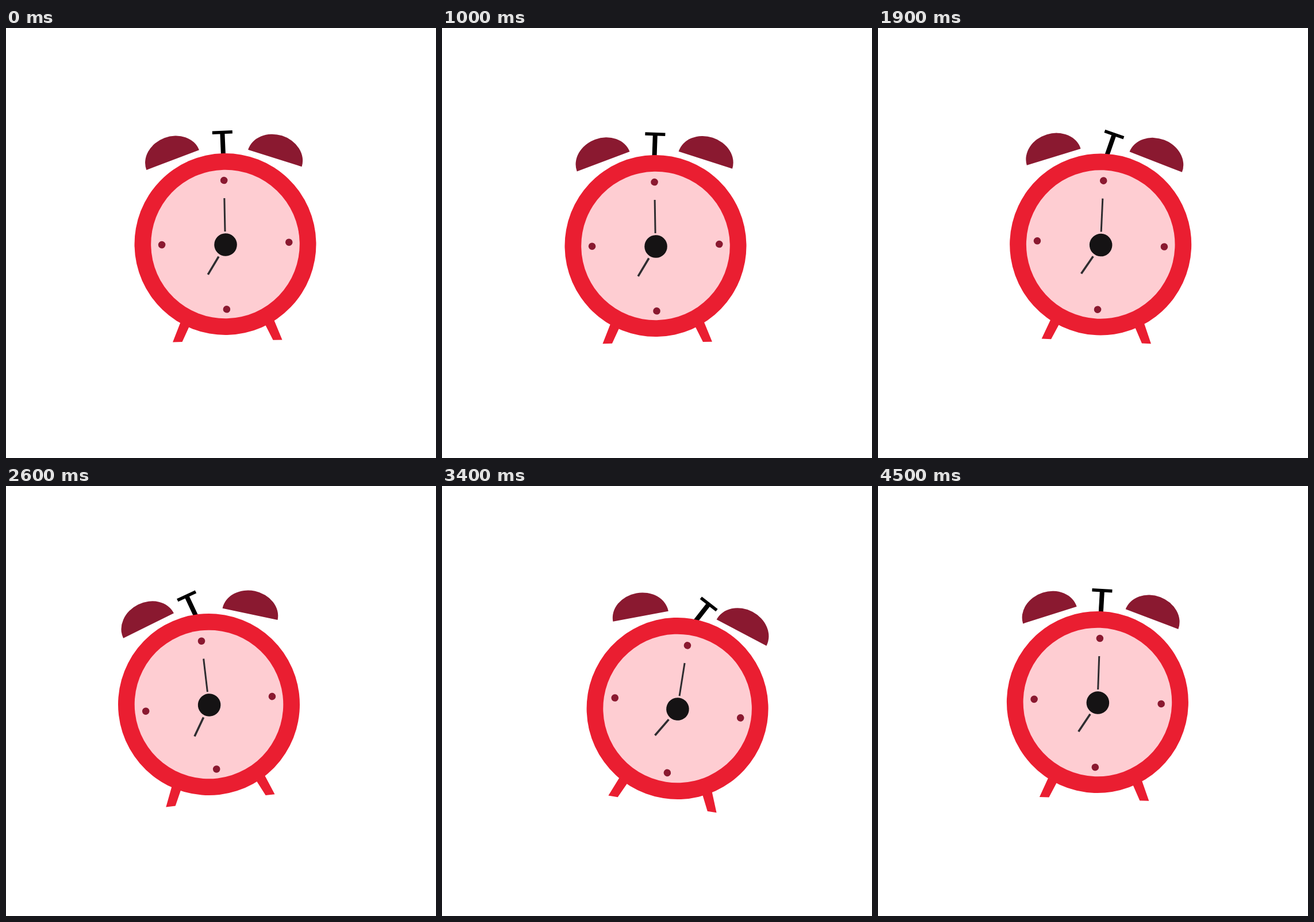
An HTML page that plays this animation: 748x748 px, repeating every 4600 ms.

```html
<!DOCTYPE html>
<html lang="en">
<head>
<meta charset="utf-8">
<title>Ringing alarm clock</title>
<style>
  html, body { margin: 0; width: 100%; height: 100%; overflow: hidden; background: #fff; }
  svg { display: block; width: 100%; height: 100%; }
</style>
</head>
<body>
<svg viewBox="0 0 748 748">
  <g id="clock">
    <g id="hammer">
      <path d="M0-192.5V-148" stroke="#000" stroke-width="8"/>
      <path d="M-17.5-194.5H17.5" stroke="#000" stroke-width="5.5"/>
    </g>
    <g fill="#8a1930">
      <path d="M-49 0A49 41 0 0 1 49 0Z" transform="translate(-88.3 -148.3) rotate(-19.6)"/>
      <path d="M-49 0A49 41 0 0 1 49 0Z" transform="translate(89.4 -147.7) rotate(18.7)"/>
    </g>
    <path fill="#ea1e31" d="M-95 168.5h16.5L-60 130h-19ZM95.5 168.5h-16L61 130h19.5Z"/>
    <circle r="158" fill="#ea1e31"/>
    <circle r="129.3" fill="#fecdd2"/>
    <g fill="#8a1930">
      <circle cx="0" cy="-111" r="6.3"/>
      <circle cx="0" cy="113.3" r="6.3"/>
      <circle cx="-110.4" cy="-1.2" r="6.3"/>
      <circle cx="110.8" cy="-1" r="6.3"/>
    </g>
    <g stroke="#2e2d30">
      <path d="M0-80V-22" stroke-width="3"/>
      <path d="M-12 21.3-31.3 52.3" stroke-width="3.6"/>
    </g>
    <circle cx=".5" cy="1" r="19.8" fill="#151314"/>
  </g>
</svg>
<script>
const LOOP = 4600, STEP = 100, HALF_SHAKE = 200;
const clock = document.getElementById('clock');
const hammer = document.getElementById('hammer');

// each pose: centre x, centre y, body tilt, hammer swing
const rest = [371.5, 379, -1, 3];
const shake = [18, 3, 5.5, 23];
const keys = [
  { at: 0, pose: [381.5, 376, -1.2, -1.2] },
  { at: 600, pose: [355.3, 381, -5.5, -12.5] },
  { at: 1400, pose: [374.1, 380.8, .2, 30] },
  { at: 1900, pose: [387.2, 376.5, 2.6, 16.6] },
  { at: 2600, pose: [353, 380, -6.7, -18.4] },
  { at: 3400, pose: [409.6, 387, 9, 29] },
  { at: 4500, pose: [381.9, 376, 2.05, 1.2] }
];
keys.push({ at: LOOP, pose: keys[0].pose });

// Between keys the clock settles towards rest while shaking in whole half waves.
function poseAt(t) {
  const i = keys.findIndex(k => k.at > t);
  const a = keys[i - 1], b = keys[i];
  const span = b.at - a.at, u = (t - a.at) / span;
  const pull = Math.sin(Math.PI * u);
  const wave = Math.sin(Math.PI * u * Math.floor(span / HALF_SHAKE));
  const towardsUpright = -Math.sign(a.pose[2]);
  return rest.map((r, k) => {
    const mix = a.pose[k] + (b.pose[k] - a.pose[k]) * u;
    return mix + (r - mix) * pull + shake[k] * wave * towardsUpright;
  });
}

const start = performance.now();
function draw() {
  const t = (performance.now() - start) % LOOP;
  const [x, y, tilt, swing] = poseAt(Math.floor(t / STEP) * STEP);
  clock.setAttribute('transform', `translate(${x} ${y}) rotate(${tilt})`);
  hammer.setAttribute('transform', `rotate(${swing} 0 -142)`);
  requestAnimationFrame(draw);
}
draw();
</script>
</body>
</html>
```
